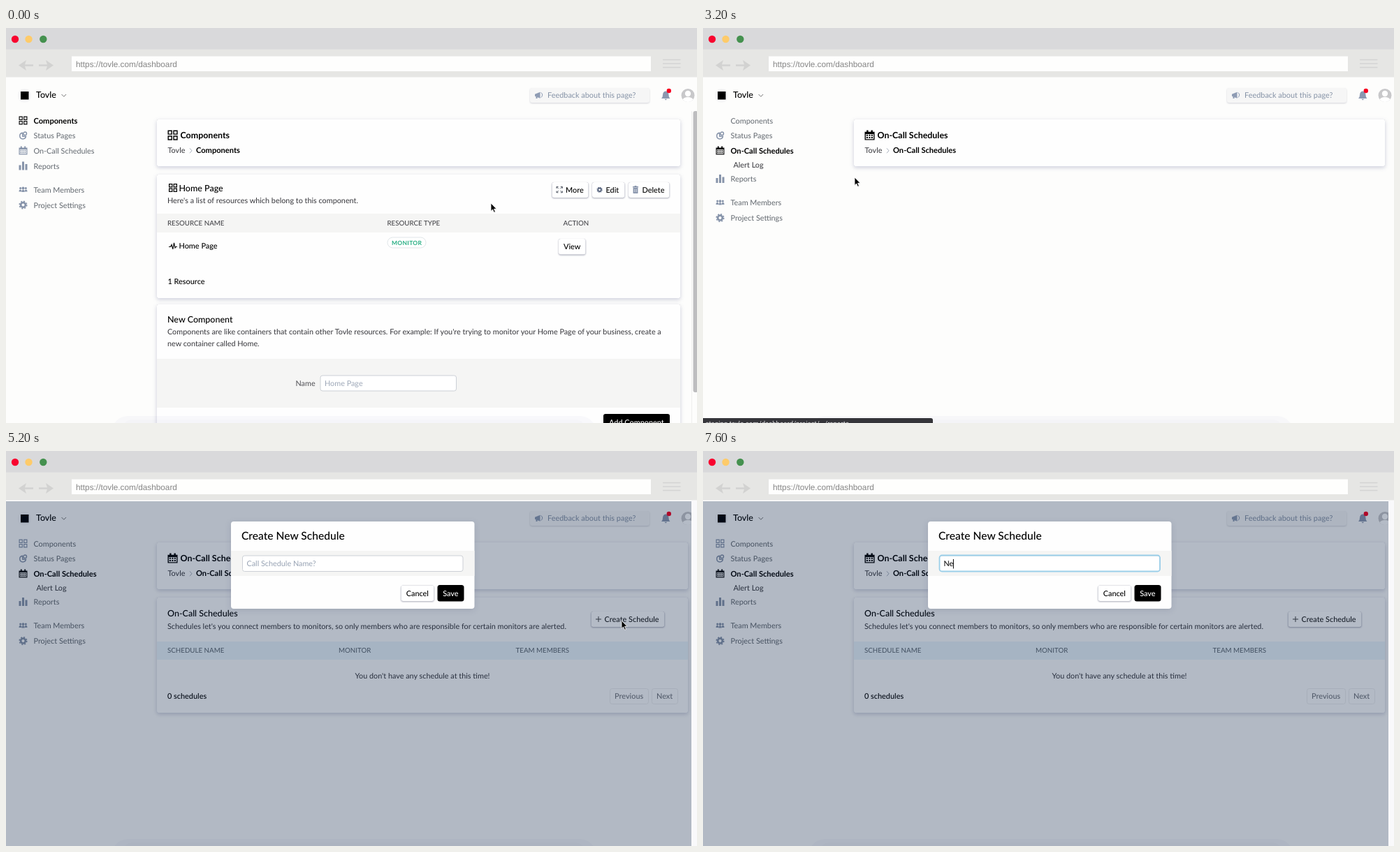
Write an HTML page that moves like this. It is 989 px wide and 566 px high and loops after 8 s.

```html
<!DOCTYPE html>
<html lang="en">
<head>
<meta charset="utf-8">
<title>Dashboard walkthrough</title>
<style>
html,body{margin:0;width:100%;height:100%;overflow:hidden;background:#fdfdfc}
svg{display:block}
.stage{font:10.83px Lato,sans-serif;text-rendering:geometricPrecision}
.b{font-size:11.1px;font-weight:700}
.m{font-size:10.9px;font-weight:500}
.h{font-size:12.5px;font-weight:500}
.t{font-size:12.45px;font-weight:700}
.title{font-size:15.6px;font-weight:500}
.p{fill:#36363b}
.th{font-size:9.75px;fill:#3a3a3f}
.nav{fill:#62686f}
.ico{color:#8794aa}
.soft{fill:#8592a6}
.card{fill:#fefefe;filter:drop-shadow(0 2px 3px rgba(60,66,130,.2)) drop-shadow(0 0 .6px rgba(60,66,100,.3))}
.btn{fill:#fff;filter:drop-shadow(0 1px 1px rgba(40,44,80,.3)) drop-shadow(0 0 .6px rgba(40,44,80,.4))}
.faint{fill:#fefefe;stroke:#ececee}
.band{fill:#f5f5f4}
.field{fill:#fff;stroke:#ccd0d6}
.end{text-anchor:middle}

.home,.calls,.list,.gridIcon,.status,.hover,.modal,.drop,.ring,.caret,.hint,.n,.ne,.arrow,.hand,.beam{animation:8s step-end infinite}
.home{animation-name:home}
.calls{animation-name:calls}
.list{animation-name:list}
.gridIcon{animation-name:gridIcon}
.status{animation-name:status}
.hover{animation-name:hover}
.modal{animation-name:modal}
.drop{animation-name:drop}
.ring{animation-name:ring}
.caret{animation-name:caret}
.hint{animation-name:hint}
.n{animation-name:n}
.ne{animation-name:ne}
.arrow{animation-name:move,arrow}
.hand{animation-name:move,hand}
.beam{animation-name:beam}
@keyframes home{0%{opacity:1}35%,to{opacity:0}}
@keyframes calls{0%{opacity:0}35%,to{opacity:1}}
@keyframes gridIcon{0%{opacity:0}42.5%,to{opacity:1}}
@keyframes list{0%{opacity:0}45%,to{opacity:1}}
@keyframes status{0%,42.5%,to{opacity:0}37.5%{opacity:1}}
@keyframes hover{0%,65%,to{opacity:0}60%{opacity:1}}
@keyframes modal{0%{opacity:0}65%,to{opacity:1}}
@keyframes drop{0%,92.5%,to{opacity:0}82.5%{opacity:1}}
@keyframes ring{0%{opacity:0}85%{opacity:.5}87.5%,to{opacity:1}}
@keyframes caret{0%{opacity:0;transform:none}82.5%{opacity:1;transform:none}92.5%{opacity:1;transform:translateX(7.6px)}95%,to{opacity:1;transform:translateX(13px)}}
@keyframes hint{0%{opacity:1}92.5%,to{opacity:0}}
@keyframes n{0%,95%,to{opacity:0}92.5%{opacity:1}}
@keyframes ne{0%{opacity:0}95%,to{opacity:1}}
@keyframes arrow{0%,40%{opacity:1}27.5%,80%,to{opacity:0}}
@keyframes hand{0%,40%,to{opacity:0}27.5%{opacity:1}}
@keyframes beam{0%,85%,to{opacity:0;transform:translate(516px,158px)}80%{opacity:1;transform:translate(516px,158px)}82.5%{opacity:1;transform:translate(503.5px,154px)}}
@keyframes move{
0%{transform:translate(694px,251px)}
2.5%{transform:translate(640px,256px)}
5%{transform:translate(460px,254px)}
7.5%{transform:translate(291px,225px)}
12.5%{transform:translate(279px,222px)}
15%{transform:translate(245px,212px)}
17.5%{transform:translate(205px,201px)}
20%{transform:translate(165px,193px)}
22.5%{transform:translate(130px,188px)}
25%{transform:translate(108px,186px)}
27.5%{transform:translate(108px,182px)}
30%{transform:translate(108px,179px)}
32.5%{transform:translate(108px,176px)}
35%{transform:translate(116px,184px)}
37.5%{transform:translate(160px,204px)}
40%{transform:translate(217px,214px)}
42.5%{transform:translate(330px,225px)}
45%{transform:translate(470px,235px)}
47.5%{transform:translate(605px,241px)}
50%{transform:translate(710px,244px)}
52.5%{transform:translate(790px,246px)}
55%{transform:translate(845px,246px)}
57.5%{transform:translate(868px,245px)}
60%{transform:translate(881px,243px)}
70%{transform:translate(872px,249px)}
72.5%{transform:translate(805px,244px)}
75%{transform:translate(695px,218px)}
77.5%,to{transform:translate(585px,184px)}
}
</style>
</head>
<body>
<svg class="stage" width="989" height="566" viewBox="0 0 989 566">
<defs>
  <path id="grid" fill="none" stroke="currentColor" stroke-width="1.2" d="M.6.6h4.2v4.2H.6zM7.2.6h4.2v4.2H7.2zM.6 7.2h4.2v4.2H.6zM7.2 7.2h4.2v4.2H7.2z"/>
  <g id="pie" fill="none" stroke="currentColor" stroke-width="1.5">
    <path d="M5 2.2a4.4 4.4 0 1 0 5 5H5.4z"/><circle cx="8.7" cy="3.3" r="2.3"/>
  </g>
  <g id="cal" fill="currentColor">
    <path fill-rule="evenodd" d="M0 2h12v10H0zM1.2 4.6v6.2h9.6V4.6z"/>
    <path d="M2.3 0h2v3h-2zM7.7 0h2v3h-2z"/>
    <path d="M2 6.2h8M2 8.9h8" stroke="currentColor" stroke-width="1.7" stroke-dasharray="1.8 1.2"/>
  </g>
  <path id="bars" fill="currentColor" d="M0 5h3v7H0zM4.5 0h3v12h-3zM9 3.5h3V12H9z"/>
  <g id="team" fill="currentColor">
    <circle cx="2.2" cy="3.5" r="1.6"/><circle cx="6" cy="3.5" r="1.9"/><circle cx="9.8" cy="3.5" r="1.6"/>
    <path d="M0 8.5q0-3 2-3t1.5 3zM3.800 9q0-3.300 2.200-3.300T8.200 9zM8.500 8.500q-.5-3 1.500-3t2 3z"/>
  </g>
  <g id="gear" fill="none" stroke="currentColor">
    <circle cx="6" cy="6" r="3.4" stroke-width="2.7"/>
    <circle cx="6" cy="6" r="5.3" stroke-width="1.5" stroke-dasharray="2.1 2.06"/>
  </g>
  <path id="chev" d="M0 0l3 3.5L0 7" fill="none" stroke="#a9b0bd"/>
  <path id="plus" d="M0 4h8M4 0v8" fill="none"/>
  <path id="back" fill="#d2d2d1" d="M18 53.5L29 46l-2 6.300h12v2.400H27l2 6.300z"/>
  <g id="lower">
    <g class="ico"><use href="#bars" x="18.5" y="191.5"/><use href="#team" x="18.5" y="226"/><use href="#gear" x="18.5" y="247.5"/></g>
    <g class="nav"><text x="39.5" y="201.700">Reports</text><text x="39.5" y="235.700">Team Members</text><text x="39.5" y="257.5">Project Settings</text></g>
  </g>
</defs>

<rect width="989" height="566" fill="#fdfdfc"/>

<!-- shared page header -->
<rect x="17" y="87" width="19" height="20" rx="9" fill="#f7f7f8"/>
<rect x="21" y="91" width="11.5" height="11.5"/>
<text class="h" x="43" y="100.3">Tovle</text>
<path d="M79.5 95l3.3 3.3 3.3-3.3" fill="none" stroke="#777"/>
<rect x="750" y="86" width="171" height="21" rx="3" fill="#f6f6f6" style="filter:drop-shadow(0 1px 1px rgba(40,44,80,.2))"/>
<path d="M757 94.800l7.500-3v9l-7.500-3zM758.500 98h2v3h-2z" fill="#8f9cb4"/>
<path d="M765.5 92.500q2.500 1.300 2.200 3.600t-2.200 3.600" fill="none" stroke="#8f9cb4"/>
<text class="soft" x="775" y="99.7" font-size="10.9">Feedback about this page?</text>
<path d="M938 101q2-1.500 2-5 0-5 4.200-5.600 4.300.6 4.300 5.600 0 3.500 2 5zM942.500 101.800h3.500q-1.700 3-3.500 0z" fill="#8b98b0"/>
<circle cx="948.8" cy="90" r="3.2" fill="#f80020"/>
<circle cx="976" cy="96.5" r="9.5" fill="#c8c8ca"/>
<circle cx="976" cy="94" r="4.2" fill="#fff"/>
<path d="M968.600 102.500q1.400-3.500 7.400-3.500t7.400 3.500a9.500 9.500 0 0 1-14.800 0z" fill="#fff"/>

<g class="home">
  <use href="#grid" x="18.5" y="126.5" color="#111"/>
  <g class="ico"><use href="#pie" x="18.5" y="148"/><use href="#cal" x="18.5" y="169.5"/></g>
  <text class="b" x="39.5" y="136.5">Components</text>
  <g class="nav"><text x="39.5" y="158.3">Status Pages</text><text x="39.5" y="180">On-Call Schedules</text></g>
  <use href="#lower"/>

  <rect class="card" x="216" y="131" width="749" height="67" rx="2"/>
  <use href="#grid" transform="translate(231.5 146.5) scale(1.18)"/>
  <text class="t" x="249.5" y="158.3">Components</text>
  <text class="p" x="231.5" y="179.3">Tovle</text><use href="#chev" x="263" y="172.3"/>
  <text class="b" x="272" y="179.3">Components</text>

  <rect class="card" x="216" y="210" width="749" height="177" rx="2"/>
  <use href="#grid" x="233" y="223"/>
  <text class="h" x="247.5" y="234.3">Home Page</text>
  <text class="p" x="231" y="250.5">Here's a list of resources which belong to this component.</text>
  <g class="btn"><rect x="781.5" y="221" width="52" height="22" rx="3"/><rect x="839" y="221" width="46.5" height="22" rx="3"/><rect x="891" y="221" width="58.5" height="22" rx="3"/></g>
  <path d="M788 227.500l2.800 2.800m2.700 2.700l2.800 2.800M796.300 227.500l-2.800 2.800m-2.700 2.700l-2.800 2.800M788 230v-2.500h2.500M793.800 227.500h2.500v2.500M788 233.500v2.300h2.500M793.800 235.800h2.500v-2.300" fill="none" stroke="#454b58" stroke-width=".9"/>
  <use href="#gear" transform="translate(845.5 227.7) scale(.68)" color="#59667f"/>
  <path d="M897 227h8v1.500h-8zM899.500 226h3v1h-3zM897.600 229h6.800v8h-6.800z" fill="#8390a8"/><path d="M899.500 230.500v5m1.500-5v5m1.500-5v5" stroke="#e9ecf2" stroke-width=".6"/>
  <g class="m"><text x="801" y="235.7">More</text><text x="858.5" y="235.7">Edit</text><text x="910.5" y="235.7">Delete</text></g>
  <rect class="band" x="216" y="266" width="749" height="27"/>
  <g class="th"><text x="231" y="283">RESOURCE NAME</text><text x="545.5" y="283">RESOURCE TYPE</text><text x="797.5" y="283">ACTION</text></g>
  <path d="M233 313.500h2.500l1.500-3 1.800 6.300 1.700-9 1.500 7.200 1-1.500h2" fill="none" stroke="#111" stroke-width="1.2"/>
  <text class="m" x="247.5" y="315.7">Home Page</text>
  <rect x="546" y="300" width="55" height="15" rx="7.5" fill="#fff" stroke="#e0e5e8"/>
  <text x="552" y="310.8" fill="#27ae83" font-size="8.5" font-weight="700" letter-spacing=".3">MONITOR</text>
  <rect class="btn" x="791" y="302" width="38.5" height="22.5" rx="3"/><text class="m" x="798" y="317.2">View</text>
  <text class="m" x="231.5" y="366.7">1 Resource</text>

  <rect class="card" x="216" y="396" width="749" height="190" rx="2"/>
  <text class="h" x="231" y="421.5">New Component</text>
  <g class="p"><text x="231" y="438.7">Components are like containers that contain other Tovle resources. For example: If you're trying to monitor your Home Page of your business, create a</text>
  <text x="231" y="455.8">new container called Home.</text></g>
  <rect class="band" x="216" y="474" width="749" height="70"/>
  <text x="414.5" y="513" fill="#505055">Name</text>
  <rect class="field" x="450" y="498" width="194.5" height="22" rx="3"/><text class="soft" x="456" y="513" opacity=".8">Home Page</text>
  <rect x="855" y="553" width="95" height="24" rx="3"/><text class="m" x="863" y="568.7" fill="#fff">Add Component</text>
  <path d="M981.5 119v447" stroke="#eee"/><rect x="983.5" y="119" width="7" height="403" rx="3" fill="#bdbdbf"/>
</g>

<g class="calls">
  <g class="ico"><g class="gridIcon"><use href="#grid" x="18.5" y="126.5"/></g><use href="#pie" x="18.5" y="148"/></g>
  <use href="#cal" x="18.5" y="169.5" color="#111"/>
  <g class="nav"><text x="39.5" y="136.5">Components</text><text x="39.5" y="158.3">Status Pages</text></g>
  <text class="b" x="39.5" y="180">On-Call Schedules</text><text class="p" x="43.5" y="200.3">Alert Log</text>
  <use href="#lower" y="18.6"/>

  <rect class="card" x="216" y="131" width="760" height="67" rx="2"/>
  <use href="#cal" transform="translate(231.5 146.5) scale(1.17)"/>
  <text class="t" x="249.5" y="158.3">On-Call Schedules</text>
  <text class="p" x="231.5" y="179.3">Tovle</text><use href="#chev" x="263" y="172.3"/>
  <text class="b" x="272" y="179.3">On-Call Schedules</text>

  <g class="list">
    <rect class="card" x="216" y="210" width="760" height="165" rx="2"/>
    <text class="h" x="231" y="237.3">On-Call Schedules</text>
    <text class="p" x="231" y="255.3">Schedules let's you connect members to monitors, so only members who are responsible for certain monitors are alerted.</text>
    <rect class="btn" x="837.5" y="230" width="105" height="22" rx="3"/>
    <use href="#plus" x="844" y="237" stroke="#444"/>
    <g class="hover"><use href="#plus" x="844" y="237" stroke="#2c2560" stroke-width="1.6"/></g>
    <text class="m" x="856.5" y="245" fill="#222">Create Schedule</text>
    <rect class="band" x="216" y="273" width="760" height="26"/>
    <g class="th"><text x="231" y="289.3">SCHEDULE NAME</text><text x="476" y="289.3">MONITOR</text><text x="729.5" y="289.3">TEAM MEMBERS</text></g>
    <text class="end p" x="596" y="325.7">You don't have any schedule at this time!</text>
    <text class="m" x="231" y="355.2">0 schedules</text>
    <rect class="faint" x="864.5" y="340.5" width="55" height="22" rx="3"/><rect class="faint" x="924.5" y="340.5" width="37" height="22" rx="3"/>
    <g class="m" fill="#74777d"><text x="871" y="355.2">Previous</text><text x="931" y="355.2">Next</text></g>
  </g>
</g>

<rect x="152" y="556" width="692" height="50" rx="22" fill="#5a5aa0" opacity=".035"/>
<rect x="164" y="561" width="668" height="50" rx="18" fill="#5a5aa0" opacity=".02"/>

<g class="status">
  <rect x="-4" y="559" width="333" height="30" rx="3" fill="#35353a"/>
  <text x="3.5" y="570" fill="#e4e4e6" style="font:9.6px Roboto,sans-serif">staging.tovle.com/dashboard/project/.../reports</text>
</g>

<g class="modal">
  <rect y="71" width="989" height="1" fill="#fff"/>
  <rect x="981" y="71" width="8" height="495" fill="#f9f9fb"/>
  <rect y="72" width="981" height="494" fill="#081e42" opacity=".3"/>
  <rect x="216" y="273" width="760" height="26" fill="#8fb4d0" opacity=".22"/>
  <rect x="322" y="101" width="348.5" height="125" rx="4" fill="#fefefe" style="filter:drop-shadow(0 2px 4px rgba(20,25,60,.13))"/>
  <text class="title" x="337" y="127.2">Create New Schedule</text>
  <rect class="band" x="322" y="143" width="348.5" height="36"/>
  <rect class="field" x="338.5" y="150" width="315.5" height="22.5" rx="3"/>
  <rect class="ring" x="338.5" y="149.5" width="315.5" height="23" rx="3.5" fill="none" stroke="#9bcfe9" stroke-width="1.8"/>
  <g class="hint"><text class="soft" x="344.5" y="165.2" opacity=".85">Call Schedule Name?</text></g>
  <text class="n" x="344.5" y="165.2">N</text>
  <text class="ne" x="344.5" y="165.2">Ne</text>
  <rect class="caret" x="344.9" y="155" width="1" height="13.5"/>
  <rect class="btn" x="565.5" y="192.5" width="47" height="22.5" rx="3"/><rect x="617.5" y="192" width="38" height="23.5" rx="3.5"/>
  <g class="m"><text x="572.7" y="207.8">Cancel</text><text x="625.2" y="207.8" fill="#fff">Save</text></g>
  <g class="drop">
    <path d="M338.5 173.5h315V237q0 4-4 4h-307q-4 0-4-4z" fill="#fefefe" style="filter:drop-shadow(0 1px 1.5px rgba(20,25,50,.45))"/>
    <g style="font:600 10px Inter,sans-serif" fill="#18181a"><text x="348" y="197">My Status Page</text><text x="348" y="225">QA Failed (x2)</text></g>
  </g>
</g>

<!-- browser frame -->
<rect width="989" height="31" fill="#d9d9db"/>
<rect y="30.5" width="989" height="40" fill="#e6e6e4"/>
<circle cx="13" cy="16" r="5.2" fill="#f8032f"/><circle cx="32.5" cy="16" r="5.2" fill="#fecb6a"/><circle cx="53.3" cy="16" r="5.2" fill="#45914f"/>
<use href="#back"/><use href="#back" transform="translate(86) scale(-1 1)"/>
<rect x="94" y="40.5" width="829" height="21.5" fill="#fefefd"/>
<text x="100" y="56" fill="#858585" style="font:11.8px 'Liberation Sans',Arial,sans-serif">https://tovle.com/dashboard</text>
<path d="M940 45.500h25.500M940 51h25.500M940 56.500h25.500" stroke="#d4d4d3" stroke-width="1.5"/>

<!-- pointers -->
<g class="arrow"><path d="M0 0v11.400l2.600-2.400 1.900 4.300 1.900-.8-1.900-4.200H8z" stroke="#fff" stroke-width=".8"/></g>
<g class="hand"><path d="M-1 1.300q0-1.300 1.100-1.300t1.200 1.300V5q1.300-.8 2 .3 1.200-.6 1.800.5 1.500-.3 1.500 1.300 0 3-1.300 4.400V13.500H-.3V12Q-2.500 9.500-3.600 7.300q0-1.600 1.400-.9l1.200 1.100z" fill="#fff" stroke="#111" stroke-width="1.1"/><path d="M1.600 8.500v2.800m1.600-2.800v2.800" stroke="#111" stroke-width=".7"/></g>
<g class="beam"><path d="M-3 1q2.500 0 3 1.500Q.5 1 3 1M0 2.200V7.500" fill="none" stroke="#222" stroke-width="1.2"/></g>
</svg>
</body>
</html>
```
